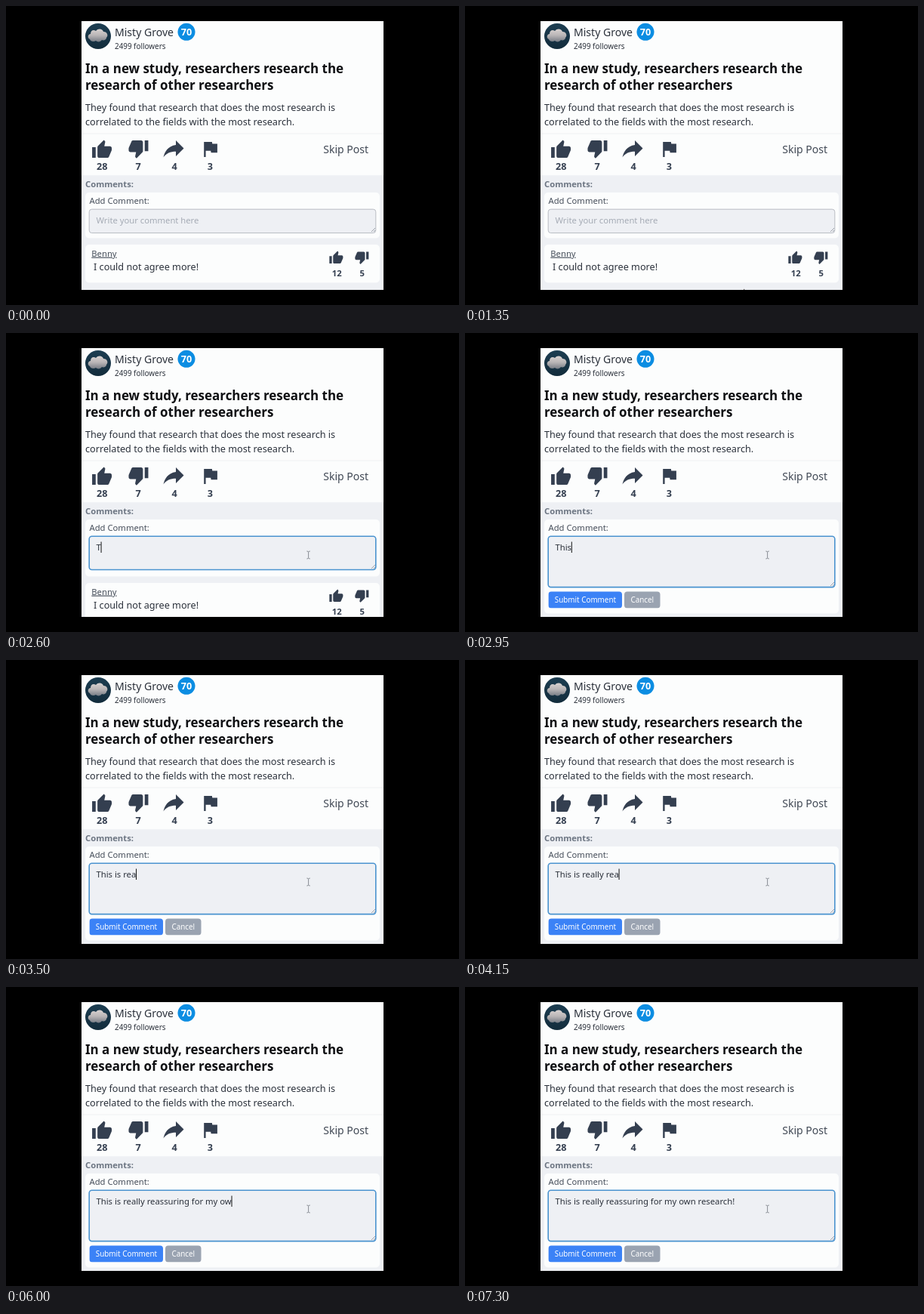
Write an HTML page that moves like this. It is 600 px wide and 396 px high and loops after 8000 ms.

```html
<!DOCTYPE html>
<html lang="en">
<head>
<meta charset="utf-8">
<title>Comment box</title>
<style>
  html, body { margin: 0; width: 100%; height: 100%; overflow: hidden; background: #000; }
  svg { display: block; }
  text { font-family: 'Noto Sans', 'Open Sans', sans-serif; white-space: pre; fill: #2b313b; }
  .bold { font-weight: 700; }
  .xl { font-size: 16.96px; fill: #0e0f12; }
  .lg { font-size: 14.06px; }
  .md { font-size: 12.65px; }
  .sm { font-size: 11.26px; }
  .xs { font-size: 9.87px; }
  .mid { text-anchor: middle; }
  .icon { fill: #343f50; }
  .count { fill: #343f50; }
  .card { fill: #fcfdfd; }
  .white { fill: #fff; }
</style>
</head>
<body>
<svg width="600" height="396" viewBox="0 0 600 396">
  <defs>
    <path id="thumb" d="M1 21h4V9H1v12zm22-11c0-1.1-.9-2-2-2h-6.31l.95-4.57.03-.32c0-.41-.17-.79-.44-1.06L14.17 1 7.59 7.59C7.22 7.95 7 8.45 7 9v10c0 1.1.9 2 2 2h9c.83 0 1.54-.5 1.84-1.22l3.02-7.05c.09-.23.14-.47.14-.73v-2z"/>
    <use id="down" href="#thumb" transform="rotate(180 12 12)"/>
    <linearGradient id="cloud" x2="0" y2="1">
      <stop stop-color="#d9d3d1"/><stop offset=".5" stop-color="#b9b5b6"/><stop offset="1" stop-color="#777c85"/>
    </linearGradient>
    <linearGradient id="sky" x2="0" y2="1">
      <stop stop-color="#1c3d51"/><stop offset="1" stop-color="#132c3c"/>
    </linearGradient>
  </defs>
  <svg x="100" y="20" width="400" height="356" viewBox="100 20 400 356">
    <path fill="#fcfdfd" d="M100 20h400v356H100z"/>

    <circle cx="122" cy="40" r="17" fill="url(#sky)"/>
    <path fill="url(#cloud)" d="M111 44c-4-2-2-7 1-7 0-5 4-6 7-4 3-4 9-3 10 1 5 0 7 5 4 8 0 3-4 4-6 3 -2 3-6 3-8 1 -3 2-7 1-8-2z"/>
    <text class="lg" x="144" y="39.5">Misty Grove</text>
    <circle cx="239" cy="34.3" r="11.5" fill="#0c8de2"/>
    <text class="md bold mid white" x="239" y="39">70</text>
    <text class="xs" x="144" y="56.8">2499 followers</text>

    <text class="xl bold" x="105" y="88.8">In a new study, researchers research the</text>
    <text class="xl bold" x="105" y="110.7">research of other researchers</text>
    <text class="md" x="105" y="138.6">They found that research that does the most research is</text>
    <text class="md" x="105" y="158.4">correlated to the fields with the most research.</text>
    <path d="M100 169h400" stroke="#f0f1f3"/>

    <g class="icon">
      <use href="#thumb" transform="translate(112.9 176.3) scale(1.18)"/>
      <use href="#down" transform="translate(161.3 174.5) scale(1.18)"/>
      <path transform="translate(204 170.5) scale(1.5)" d="M14 9V5l7 7-7 7v-4.1c-5 0-8.5 1.6-11 5.1 1-5 4-10 11-11z"/>
      <path transform="translate(256.3 175.3) scale(1.18)" d="M14.4 6L14 4H5v17h2v-7h5.6l.4 2h7V6z"/>
    </g>
    <g class="md bold mid">
      <text class="count" x="127.2" y="217.3">28</text>
      <text class="count" x="175.2" y="217.3">7</text>
      <text class="count" x="223.2" y="217.3">4</text>
      <text class="count" x="270.4" y="217.3">3</text>
    </g>
    <text class="lg" x="420.2" y="195" style="fill:#414955">Skip Post</text>

    <path fill="#eef0f4" d="M100 224.3h400V376H100z"/>
    <text class="sm bold" x="105" y="239.8" style="fill:#6d7683">Comments:</text>
    <rect id="form" class="card" x="105" y="247" width="390" rx="5"/>
    <text class="sm" x="110.5" y="262" style="fill:#474f5b">Add Comment:</text>
    <rect id="area" x="110.2" y="269.2" width="379.6" rx="3.5" fill="#eef0f4"/>
    <path id="grip" d="M484 299l5-5M487 299l2-2" stroke="#8b9099" stroke-width=".8"/>
    <text id="hint" class="sm" x="119.5" y="288" style="fill:#a5abb5">Write your comment here</text>
    <text id="typed" class="sm" x="119.5" y="288"></text>
    <path id="caret" d="M0 276.5v14.5" stroke="#111"/>

    <svg id="row" x="110.4" width="200">
      <rect y="6" width="97.6" height="22" rx="4" fill="#3b82f6"/>
      <text class="xs mid white" x="49" y="20.6">Submit Comment</text>
      <rect x="100.6" y="6" width="47.5" height="22" rx="4" fill="#9aa3b1"/>
      <text class="xs mid white" x="124.4" y="20.6">Cancel</text>
    </svg>

    <g id="reply">
      <rect class="card" x="105" y="316" width="390" height="50.5" rx="5"/>
      <text class="sm" x="113.3" y="331.7" style="fill:#474f5b" text-decoration="underline">Benny</text>
      <text class="md" x="116" y="350">I could not agree more!</text>
      <g class="icon">
        <use href="#thumb" transform="translate(427.5 323.8) scale(.82)"/>
        <use href="#down" transform="translate(461.5 323.1) scale(.82)"/>
      </g>
      <text class="sm bold mid count" x="438.2" y="357.8">12</text>
      <text class="sm bold mid count" x="471.8" y="357.8">5</text>
    </g>

    <path id="arrow" d="M0 0v11l2.6-2.4 1.8 4 1.6-.7-1.8-3.9h3.6z" fill="#111" stroke="#fff" stroke-width=".6"/>
    <path id="beam" d="M-2.2-5q2.2 0 2.2 1.3 0-1.3 2.2-1.3M0-3.7v7.4M-2.2 5q2.2 0 2.2-1.3 0 1.3 2.2 1.3" fill="none" stroke="#7d828a" stroke-width=".9"/>
  </svg>
</svg>
<script>
const LOOP = 8000, STEP = 50, FOCUS = 1800, TYPE = 2600;
const MESSAGE = 'This is really reassuring for my own research!';
// Key presses, counted in steps
const keys = [
  52, 54, 56, 59, 60, 61, 62, 64, 66, 67, 70, 71, 73, 75, 78, 79, 80, 83, 84, 85, 86, 88, 91,
  93, 97, 99, 101, 104, 106, 108, 110, 113, 115, 117, 119, 121, 122, 123, 125, 126, 128, 129,
  131, 133, 134, 138
];
const $ = id => document.getElementById(id);
const [form, area, grip, hint, typed, caret, row, reply, arrow, beam] =
  ['form', 'area', 'grip', 'hint', 'typed', 'caret', 'row', 'reply', 'arrow', 'beam'].map($);
const clamp = v => Math.max(0, Math.min(1, v));
const easeOut = p => 1 - (1 - p) ** 2;
const set = (el, attrs) => { for (const k in attrs) el.setAttribute(k, attrs[k]); };
const show = (el, on) => set(el, { opacity: +on });
const move = (el, x, y) => set(el, { transform: `translate(${x} ${y})` });

function draw(t) {
  const focused = t >= FOCUS, typing = t >= TYPE;

  const grow = typing ? 36 * easeOut(clamp((t - 2550) / 250)) : 0;
  const reveal = typing ? 28 * clamp((t - 2585) / 215) : 0;
  set(form, { height: 60.5 + grow + reveal });
  set(area, {
    height: 31.4 + grow,
    stroke: focused ? '#4a93cf' : '#b8bcc3',
    'stroke-width': focused ? 1.6 : 1
  });
  set(row, { y: 300.5 + grow, height: reveal });
  move(grip, 0, grow);
  move(reply, 0, grow + reveal);

  show(hint, !typing);
  typed.textContent = MESSAGE.slice(0, keys.filter(k => k * STEP <= t).length);
  const width = typing ? typed.getComputedTextLength() : 0;
  move(caret, 119.8 + width, 0);
  set(caret, { opacity: !focused || t >= 7300 ? 0 : t >= 7250 ? .5 : 1 });

  const p = easeOut(clamp((t - 1350) / 400));
  const x = 369 + 31.6 * p, y = 374 - 80 * p;
  move(arrow, x, y);
  move(beam, x, y);
  show(arrow, t >= 1350 && y > 300);
  show(beam, y <= 300);
}

const start = performance.now();
function frame() {
  const t = (performance.now() - start) % LOOP;
  draw(Math.floor(t / STEP) * STEP);
  requestAnimationFrame(frame);
}
frame();
</script>
</body>
</html>
```
